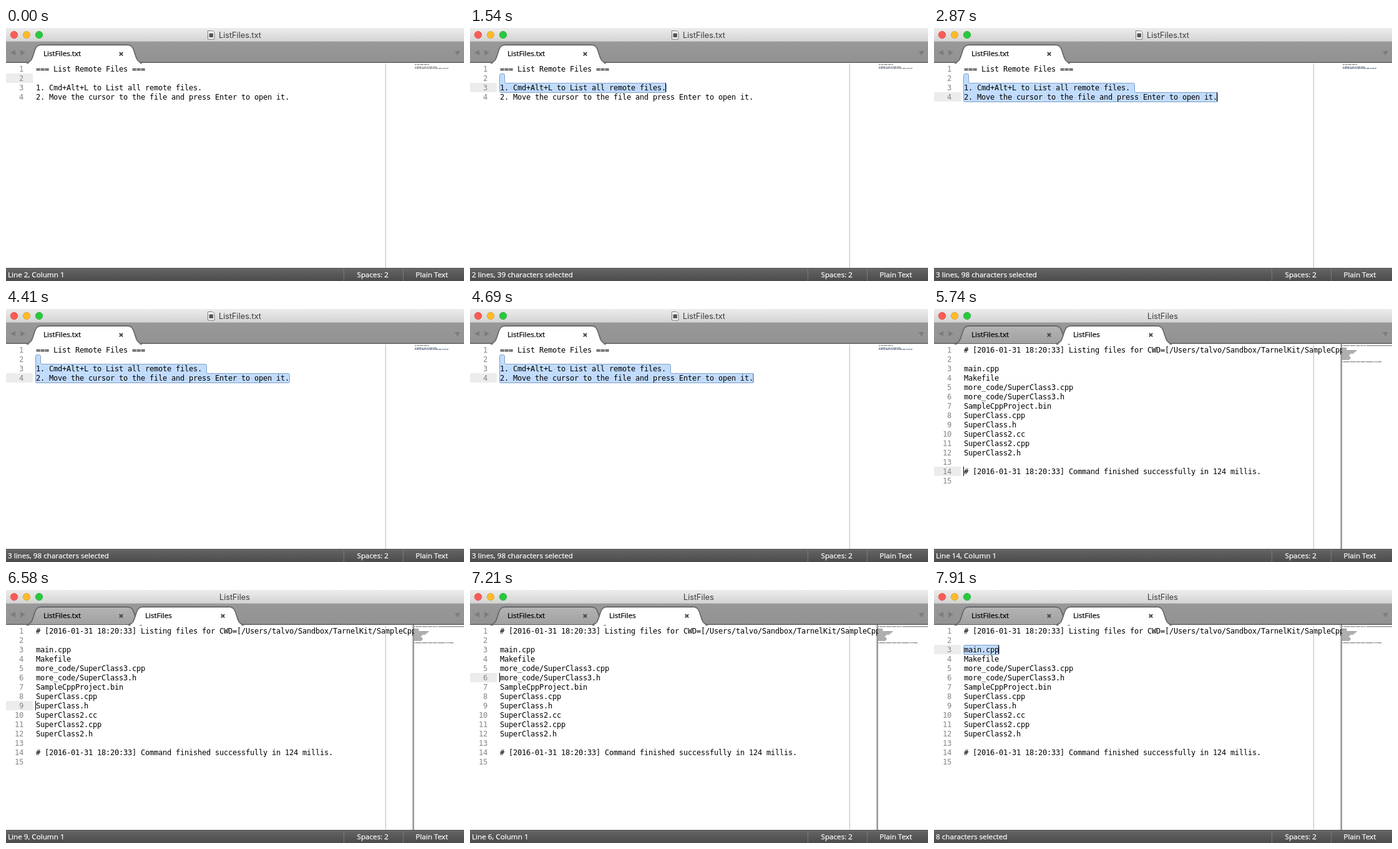
An HTML page that plays this animation: 734x406 px, repeating every 8 s.

```html
<!DOCTYPE html>
<html lang="en">
<head>
<meta charset="utf-8">
<title>Editor</title>
<style>
  html, body { margin: 0; width: 100%; height: 100%; overflow: hidden; background: #fff; }
  svg { display: block; width: 734px; height: 406px; }
  text { white-space: pre; }
  .code { font: 12px "DejaVu Sans Mono", Menlo, monospace; letter-spacing: -.224px; }
  .ui { font: 11.68px "Open Sans", "Noto Sans", sans-serif; stroke-width: .25px; }
  .title { font: 12.7px Inter, Roboto, sans-serif; fill: #3c3c3c; }
  .num { fill: #858585; text-anchor: end; }
  .tab { fill: #000; stroke: #000; }
  .status { fill: #fff; stroke: #fff; }
</style>
</head>
<body>
<svg viewBox="0 0 734 406" xmlns="http://www.w3.org/2000/svg">
  <defs>
    <linearGradient id="titleBg" x2="0" y2="1">
      <stop stop-color="#ececec"/><stop offset="1" stop-color="#d3d3d3"/>
    </linearGradient>
    <linearGradient id="barBg" x2="0" y2="1">
      <stop stop-color="#989898"/><stop offset="1" stop-color="#929292"/>
    </linearGradient>
    <linearGradient id="tabBg" x2="0" y2="1">
      <stop stop-color="#b4b4b4"/><stop offset="1" stop-color="#a0a0a0"/>
    </linearGradient>
    <linearGradient id="statusBg" x2="0" y2="1">
      <stop stop-color="#666"/><stop offset="1" stop-color="#4b4b4b"/>
    </linearGradient>
    <linearGradient id="edge">
      <stop stop-color="#000" stop-opacity="0"/><stop offset="1" stop-color="#000" stop-opacity=".55"/>
    </linearGradient>
    <clipPath id="page"><rect y="56" width="655" height="329"/></clipPath>
  </defs>
  <rect width="734" height="406" fill="#fff"/>
  <g id="editor"></g>
  <rect width="734" height="22" fill="url(#titleBg)"/>
  <rect y="21" width="734" height="1" fill="#bdbdbd"/>
  <g stroke-width=".8">
    <circle cx="13" cy="11" r="5.7" fill="#fc5b57" stroke="#e2443f"/>
    <circle cx="33" cy="11" r="5.7" fill="#fdbb2d" stroke="#dfa023"/>
    <circle cx="53" cy="11" r="5.7" fill="#29c840" stroke="#1dad2b"/>
  </g>
  <rect y="22" width="734" height="34" fill="url(#barBg)"/>
  <rect y="54" width="734" height="1" fill="#7c7c7c"/>
  <rect y="55" width="734" height="1" fill="#5e5e5e"/>
  <path d="M15 35v9l-8-4.5zM23 35v9l8-4.5zM719 37h9l-4.5 7z" fill="#7c7c7c"/>
  <g id="tabs"></g>
  <rect y="385" width="734" height="21" fill="url(#statusBg)"/>
  <rect y="385" width="734" height="1" fill="#3d3d3d"/>
  <rect y="386" width="734" height="1" fill="#747474"/>
  <path d="M541.5 387v19M636.5 387v19" stroke="#7a7a7a"/>
  <g class="ui status">
    <text x="562.5" y="400">Spaces: 2</text>
    <text x="656.5" y="400">Plain Text</text>
    <g id="status"></g>
  </g>
</svg>
<script>
(() => {
  const LOOP = 8000, STEP = 70, LEFT = 48, CHAR = 7, LINE = 15;
  const el = id => document.getElementById(id);

  const notes = [
    '=== List Remote Files ===', '',
    '1. Cmd+Alt+L to List all remote files.',
    '2. Move the cursor to the file and press Enter to open it.'
  ];
  const stamp = '# [2016-01-31 18:20:33] ';
  const header = [stamp + 'Listing files for CWD=[/Users/talvo/Sandbox/TarnelKit/SampleCppProject]', ''];
  const listing = [...header,
    'main.cpp', 'Makefile', 'more_code/SuperClass3.cpp', 'more_code/SuperClass3.h',
    'SampleCppProject.bin', 'SuperClass.cpp', 'SuperClass.h',
    'SuperClass2.cc', 'SuperClass2.cpp', 'SuperClass2.h'
  ];
  const finished = [...listing, '', stamp + 'Command finished successfully in 124 millis.', ''];

  // sel holds the first selected row and the right edge of each selected row
  const scenes = [
    { at: 0, lines: notes, row: 2 },
    { at: 1330, lines: notes, row: 3, sel: [2, 55], status: '2 lines, 1 character selected' },
    { at: 1540, lines: notes, row: 3, col: 38, sel: [2, 55, 314], status: '2 lines, 39 characters selected' },
    { at: 1680, lines: notes, row: 4, col: 58, sel: [2, 55, 321, 454], status: '3 lines, 98 characters selected' },
    { at: 4760, lines: [...header, ''], row: 3, list: true, fish: 119 },
    { at: 4830, lines: [...listing, ''], row: 13, list: true, fish: 126 },
    { at: 4900, lines: finished, row: 15, list: true }
  ];
  [5740, 5880, 6090, 6230, 6440, 6580, 6790, 7000, 7140, 7350, 7490, 7700].forEach((at, i) =>
    scenes.push({ at, lines: finished, row: 14 - i, list: true }));
  scenes.push({ at: 7910, lines: finished, row: 3, col: 8, list: true, sel: [3, 104], status: '8 characters selected' });

  // caret changes: 1 fades in, 0 fades out, 2 shows at once
  const blinks = [[0, 0], [70, 1], [560, 0], [1120, 1], [1330, 2], [2030, 0], [2660, 1], [3150, 0],
    [3710, 1], [4200, 0], [4690, 1], [4760, 2], [5250, 0], [5740, 2]];

  const last = (list, test) => list.filter(test).pop();
  const rowTop = row => 58 + (row - 1) * LINE;
  const rect = (x, y, w, h, fill) => `<rect x="${x}" y="${y}" width="${w}" height="${h}" fill="${fill}"/>`;
  const text = (x, y, s, cls = '') =>
    `<text x="${x}" y="${y}" class="${cls}">${s.replace(/</g, '&lt;').replace(/>/g, '&gt;')}</text>`;

  function caretAlpha(t) {
    if (t < STEP) return 0;
    const [at, kind] = last(blinks, b => b[0] <= t);
    const p = Math.min(1, (Math.floor((t - at) / STEP) + 1) / 4);
    return kind === 2 ? 1 : kind ? p : 1 - p;
  }

  function selection([first, ...edges], lines) {
    const x = 47.5, r = 2.5;
    let y = rowTop(first) + .5;
    let d = `M${x} ${y + r}q0 ${-r} ${r} ${-r}`, dots = '';
    edges.forEach((edge, i) => {
      const end = edge + .5;
      const turn = i < edges.length - 1 ? r : -r;
      d += `H${end - r}q${r} 0 ${r} ${r}V${y + LINE - r}q0 ${r} ${turn} ${r}`;
      [...lines[first + i - 1]].forEach((c, k) => {
        if (c === ' ') dots += rect(LEFT + k * CHAR + 3, y + 7.5, 1, 1, '#86a9d2');
      });
      y += LINE;
    });
    d += `H${x + r}q${-r} 0 ${-r} ${-r}Z`;
    return `<path d="${d}" fill="#c2dcfe" stroke="#7f9fc6"/>` + dots;
  }

  function minimap(s) {
    const x = s.list ? 654 : 655, unit = .93;
    const [first, ...edges] = s.sel || [0];
    let out = s.list ? rect(654, 56, 80, 329, '#fff') + rect(650, 56, 4, 329, 'url(#edge)') : '';
    s.lines.forEach((line, i) => {
      const picked = i + 1 >= first && i + 1 < first + edges.length;
      for (const m of line.matchAll(/\S+/g))
        out += rect(x + m.index * unit, 58 + i * 2, m[0].length * unit, 1.4, picked ? '#6c7a90' : '#8c8c8c');
    });
    return out;
  }

  function editor(s) {
    let code = s.sel ? selection(s.sel, s.lines) : '', nums = '';
    s.lines.forEach((line, i) => {
      const y = rowTop(i + 1) + 12;
      nums += text(28, y, String(i + 1), 'num');
      code += text(LEFT, y, line);
    });
    const caretX = LEFT - 1 + (s.col || 0) * CHAR;
    return rect(0, rowTop(s.row), 43, LINE, '#ececec') +
      `<g class="code" clip-path="url(#page)">${nums}${code}</g>` +
      rect(608, 57, 1, 328, '#b9bbbd') + minimap(s) +
      `<rect id="caret" x="${caretX}" y="${rowTop(s.row)}" width="1" height="${LINE}"/>`;
  }

  function tab(x, label, active) {
    const shape = 'M33 56c8-1 9-7 11.5-14c2.5-8 4-14.5 12-14.5h138c8 0 9.5 6.5 12 14.5c2.5 7 3.5 13 11.5 14';
    const close = x + 184.5;
    return `<g transform="translate(${x})">
      <path d="${shape}" fill="none" stroke="#7d7d7d" stroke-width="3"/>
      <path d="${shape}z" fill="${active ? '#fff' : 'url(#tabBg)'}"/>
      <path d="${shape}" fill="none" stroke="#505050"/></g>` +
      (active ? '' : rect(x + 33, 55, 185, 1, '#5e5e5e')) +
      text(x + 60, 45, label, 'ui tab') +
      `<path d="M${close - 2.7} 39l5.4 5.4m0-5.4l-5.4 5.4" stroke="#484848" stroke-width="2"/>`;
  }

  function tabs(list) {
    if (list) return text(342, 16, 'ListFiles', 'title') + tab(0, 'ListFiles.txt') + tab(163, 'ListFiles', true);
    return '<path d="M323.5 4.5h7.5l3 3v10.5h-10.5z" fill="#fff" stroke="#777"/>' +
      rect(325.5, 8.5, 6.5, 6.5, '#555') +
      text(341, 16, 'ListFiles.txt', 'title') + tab(0, 'ListFiles.txt', true);
  }

  function statusLine(s) {
    const place = `Line ${s.row}, Column 1`;
    if (!s.fish) return text(3, 400, s.status || place);
    return text(3, 400, place + '; (') + text(s.fish, 400, '><>') + text(259, 400, ')');
  }

  let shown, start;
  function draw(t) {
    const s = last(scenes, c => c.at <= t);
    if (s !== shown) {
      el('editor').innerHTML = editor(s);
      el('tabs').innerHTML = tabs(s.list);
      el('status').innerHTML = statusLine(s);
      shown = s;
    }
    el('caret').setAttribute('opacity', caretAlpha(t));
  }

  function frame(now) {
    start ??= now;
    draw((now - start) % LOOP);
    requestAnimationFrame(frame);
  }
  draw(0);
  requestAnimationFrame(frame);
})();
</script>
</body>
</html>
```
